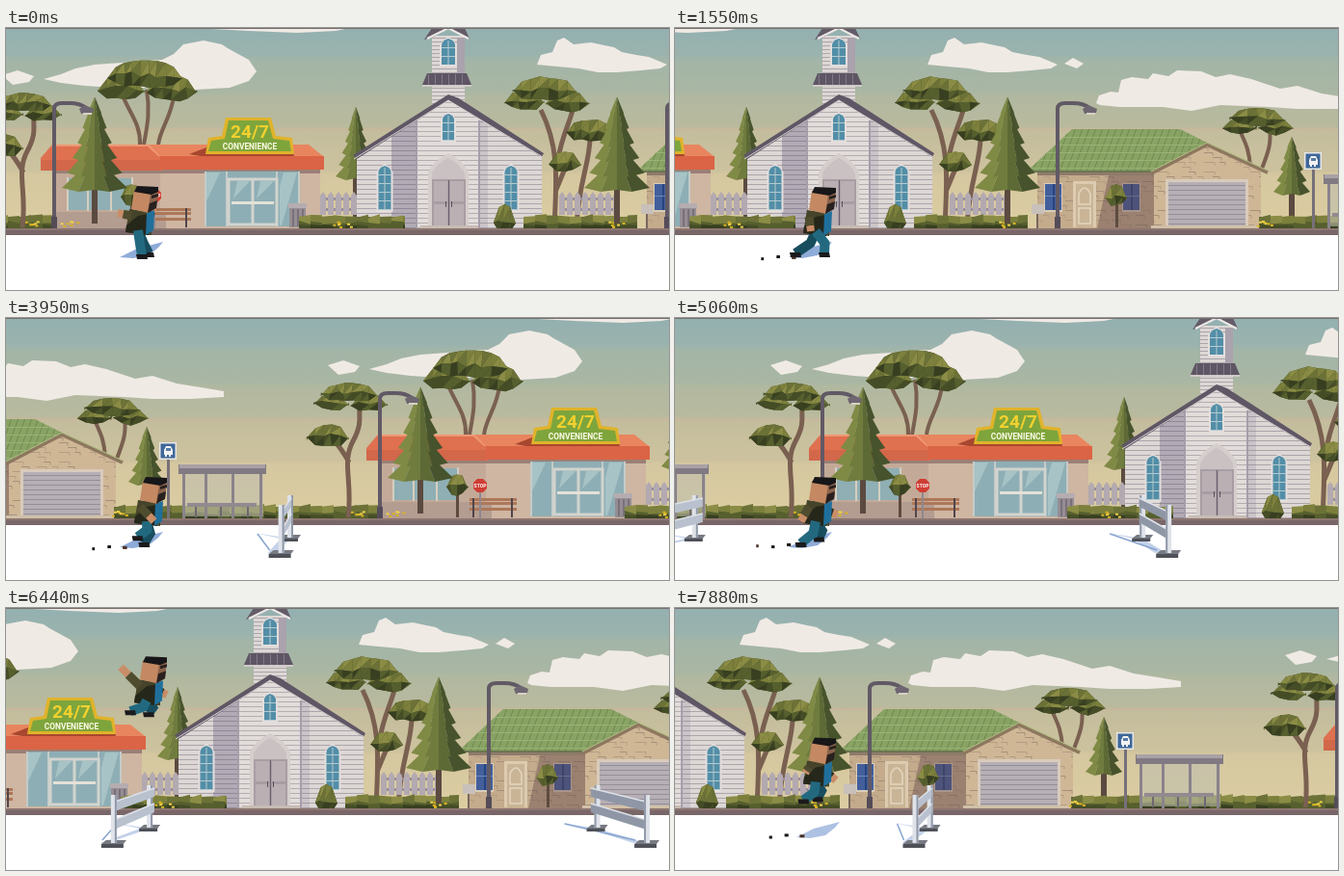
An HTML page with a canvas that plays this animation: 688x272 px, repeating every 8 s.

```html
<!DOCTYPE html>
<html lang="en">
<head>
<meta charset="utf-8">
<title>Street runner</title>
<style>
html, body { margin: 0; width: 100%; height: 100%; overflow: hidden; background: #fff; }
canvas { display: block; }
</style>
</head>
<body>
<canvas id="stage" width="688" height="272"></canvas>
<script>
const ctx = document.getElementById('stage').getContext('2d');
const W = 688, H = 272, LOOP = 8000, PERIOD = 1121;

// Redraw times: [first, count], 120 ms apart within a group
const times = [0];
for (const [start, n] of [[500, 3], [890, 2], [1160, 1], [1310, 3], [1700, 3], [2090, 4], [2600, 11],
  [3950, 4], [4460, 11], [5810, 3], [6200, 9], [7310, 2], [7580, 1], [7730, 1], [7880, 1]])
  for (let i = 0; i < n; i++) times.push(start + i * 120);

const scrollKeys = [[0, 0], [500, 72], [1550, 289], [2600, 505], [3950, 783], [5060, 1018], [6440, 1306], [7880, 1605]];
function scrollAt(t) {
  let i = 1;
  while (i < scrollKeys.length - 1 && t > scrollKeys[i][0]) i++;
  const [t0, s0] = scrollKeys[i - 1], [t1, s1] = scrollKeys[i];
  return Math.round(s0 + (s1 - s0) * (t - t0) / (t1 - t0));
}

// Drawing helpers
let seed = 1;
const rnd = () => (seed = seed * 16807 % 2147483647) / 2147483647;
const shape = (color, d) => { ctx.fillStyle = color; ctx.fill(new Path2D(d)); };
const rect = (color, x, y, w, h) => { ctx.fillStyle = color; ctx.fillRect(x, y, w, h); };
const line = (color, width, d) => { ctx.strokeStyle = color; ctx.lineWidth = width; ctx.stroke(new Path2D(d)); };
const poly = (color, pts) => shape(color, 'M' + pts.map(p => p.join(' ')).join('L') + 'Z');
function at(x, draw) { ctx.save(); ctx.translate(x, 0); draw(); ctx.restore(); }
function clipped(d, draw) { ctx.save(); ctx.clip(new Path2D(d)); draw(); ctx.restore(); }
function label(text, x, y, size, color) {
  ctx.font = `bold condensed ${size}px Roboto, "Open Sans", sans-serif`;
  ctx.textAlign = 'center';
  ctx.fillStyle = color;
  ctx.fillText(text, x, y);
}

// Faceted foliage
const LIGHT = ['#8b8c45', '#7c803c', '#6c7237'], DARK = ['#565f2e', '#454d27', '#383f21'];
const pick = list => list[Math.floor(rnd() * list.length)];
function crown(x, y, w, h) {
  const n = Math.max(4, Math.round(w / 9)), rows = [[], [], []];
  for (let i = 0; i <= n; i++) {
    const u = i / n, a = Math.sin(Math.PI * u) ** .4;
    const top = h * (.6 - .6 * a) + rnd() * 2, low = h * (.65 + .35 * a) - rnd() * 3;
    [top, top + (low - top) * (.4 + rnd() * .25), low].forEach((v, r) =>
      rows[r].push([x + u * w + (r === 1 ? (rnd() - .5) * 5 : 0), y + v]));
  }
  poly(DARK[1], [...rows[0], ...rows[2].slice().reverse()]);
  for (let i = 0; i < n; i++) for (let r = 0; r < 2; r++) {
    const tone = r ? DARK : LIGHT, a = rows[r], b = rows[r + 1];
    poly(pick(tone), [a[i], a[i + 1], b[i]]);
    poly(pick(tone), [a[i + 1], b[i + 1], b[i]]);
  }
}
function acacia(x, y, w, h) {
  crown(x, y + h * .38, w * .48, h * .58);
  crown(x + w * .5, y + h * .36, w * .5, h * .64);
  crown(x + w * .1, y, w * .76, h * .68);
}
function conifer(x, top, bottom, half, tiers = 6) {
  rect('#5b4a40', x - 3, bottom - 4, 6, 207 - bottom);
  const step = (bottom - top) / (tiers + .3);
  const edges = [-1, -.5, 0, .45, 1], tones = ['#7f8a45', '#707c3e', '#5d6a36', '#47532c'];
  for (let i = tiers - 1; i >= 0; i--) {
    const y = top + i * step, r = half * (i + 1.3) / (tiers + .3), low = y + step * 1.3;
    const neck = i ? .5 : .05;
    for (let k = 0; k < 4; k++)
      poly(tones[k], [[x + edges[k] * r * neck, y], [x + edges[k + 1] * r * neck, y],
        [x + edges[k + 1] * r, low - (k === 3 ? 4 : k % 2 * 2)], [x + edges[k] * r, low - (k ? (k + 1) % 2 * 2 : 4)]]);
  }
}
function hedge(x, w) {
  rect(DARK[0], x, 196, w, 13);
  for (let i = 0; i < w; i += 12) {
    const a = Math.min(w, i + 12), j = 193 + rnd() * 3;
    poly(pick(LIGHT), [[x + i, j + 1], [x + a, 193 + rnd() * 3], [x + a, 201 + rnd() * 3], [x + i, 200 + rnd() * 4]]);
    poly(pick(DARK), [[x + i, 204], [x + a, 205], [x + a, 209], [x + i, 209]]);
  }
}
function flowers(x) {
  for (let i = 0; i < 7; i++) rect(i % 3 ? '#d9b324' : '#eed04a', x - 9 + rnd() * 18, 200 + rnd() * 6, 3, 2);
}
function fence(x, w) {
  rect('#978d99', x, 176, w, 3);
  rect('#978d99', x, 187, w, 3);
  for (let i = 0; i < w - 4; i += 8) shape('#b3a9b0', `M${x + i} 194V174l3-4 3 4V194Z`);
}
function lamp(x) {
  line('#615965', 4, `M${x} 209V84Q${x} 78 ${x + 8} 78H${x + 16}Q${x + 27} 78 ${x + 33} 83`);
  rect('#544c58', x - 3, 196, 6, 13);
  shape('#6d6570', `M${x + 26} 84l6-4 9 4-1 4-12 1Z`);
  rect('#d8d2c4', x + 30, 88, 9, 2);
}
function sapling(x) {
  rect('#5e4b3e', x - 1, 180, 3, 27);
  crown(x - 11, 161, 22, 25);
}
function siding(d, fill, groove, step) {
  shape(fill, d);
  clipped(d, () => { for (let y = 2; y < 208; y += step) rect(groove, 0, y, PERIOD, 1); });
}

function clouds() {
  const c = '#f0eae5';
  at(289, () => {
    shape(c, 'M262 38L266 28 278 25 283 13 290 10 300 17 318 15 332 18 342 20 350 25 365 28 378 30 390 35 397 38 390 42 370 44 345 46 325 46 305 42 283 40Z');
    shape(c, 'M404 37L413 31 424 37 417 42Z');
  });
  at(505, () => shape(c, 'M221 78L224 70 236 66 244 67 247 54 258 51 275 53 280 47 296 50 305 44 330 45 345 51 360 48 382 53 412 63 430 60 455 68 480 72 504 76 504 82 470 84 430 84 400 82 350 80 320 86 290 82 245 82 225 80Z'));
  at(-338, () => {
    shape(c, 'M334 49L350 44 367 50 362 56 345 59Z');
    shape(c, 'M377 53L395 48 410 42 430 38 500 33 512 27 522 17 543 13 562 17 568 21 590 33 598 45 590 55 570 62 535 64 500 62 450 62 420 60 395 57Z');
    shape(c, 'M533 0H695L680 3 640 5 590 3Z');
  });
}

function backTrees() {
  const bark = '#7a6050';
  line(bark, 4, 'M139 121C140 100 128 88 121 70M143 121C146 104 150 88 146 64M158 121C160 104 172 92 174 70');
  acacia(95, 33, 102, 44);
  line(bark, 5, 'M17 207C22 170 10 150 22 128S26 100 30 86M18 150C12 138 6 132 2 126');
  acacia(-19, 67, 77, 31);
  crown(-26, 110, 44, 25);
  line(bark, 5, 'M569 207C571 160 575 125 555 85M572 140C577 110 585 100 590 78M592 207C594 160 606 140 606 114M570 170L580 146');
  acacia(517, 50, 87, 38);
  crown(581, 94, 50, 25);
  crown(563, 128, 34, 22);
  line(bark, 4, 'M886 145C885 125 880 118 874 104M898 146C905 128 908 120 906 102');
  acacia(857, 82, 74, 30);
  conifer(363, 82, 158, 21);
  conifer(929, 113, 174, 19, 5);
}

function store() {
  rect('#c3aa98', 48, 146, 118, 62);
  rect('#ceb6a2', 160, 146, 166, 62);
  rect('#9a8077', 48, 147, 278, 4);
  rect('#b39c90', 48, 191, 118, 17);
  rect('#8fafb4', 63, 156, 68, 33);
  for (const x of [63, 84, 108, 130]) rect('#d5cec0', x, 155, 2, 35);
  rect('#8eaeb5', 206, 149, 98, 57);
  shape('#a7c3c5', 'M208 150H222L208 180ZM288 150H302L286 205H284V165Z');
  for (const x of [206, 228, 280, 303]) rect('#c5cbc8', x, 149, 2, 57);
  line('#d2d4ce', 3, 'M231 157H281V204H231ZM256 157V204');
  rect('#e4e1d7', 234, 180, 44, 3);
  shape('#a7c3c5', 'M240 159H253L236 177ZM264 159H278L260 177Z');
  shape('#df7050', 'M36 135L48 121H151L162 133V148H36Z');
  rect('#d2674a', 36, 137, 124, 11);
  shape('#e8855f', 'M149 121H314L329 133H160Z');
  shape('#da6445', 'M160 133H330V147H160Z');
  shape('#f09773', 'M48 121H149L160 133H158L147 123H47Z');
  shape('#a8472f', 'M190 131L208 124H297L299 133H202Z');
  shape('#e0b32b', 'M228 93H275L280 112 297 114 299 131H207L210 114 224 112Z');
  shape('#7ea53c', 'M231 96H272L277 115 294 117 296 128H210L213 117 227 115Z');
  label('24/7', 253, 114, 19, '#f2d12f');
  label('CONVENIENCE', 253, 125.5, 8.4, '#fffbe8');
  for (const y of [187, 191, 197]) rect('#ad7758', 143, y, 49, 3);
  for (const x of [146, 186]) rect('#51454a', x, 187, 2, 20);
  rect('#958d93', 294, 186, 17, 21);
  rect('#b5adb0', 293, 182, 19, 5);
  for (const x of [297, 302, 307]) rect('#79717a', x, 188, 2, 18);
  sapling(130);
  rect('#908790', 153, 178, 2, 30);
  shape('#cf3d33', 'M151 167H157L161 171V177L157 181H151L147 177V171Z');
  label('STOP', 154, 176, 5, '#fff');
}

function archWindow(x, y, w, h) {
  const arch = (g, c) => shape(c, `M${x - w - g} ${y + h + g}V${y + w}Q${x - w} ${y + 2} ${x} ${y - g}Q${x + w} ${y + 2} ${x + w + g} ${y + w}V${y + h + g}Z`);
  arch(2, '#e4dedd');
  arch(0, '#528ea7');
  rect('#b5cad0', x - .5, y + 2, 1, h - 2);
  for (let v = y + 9; v < y + h; v += 9) rect('#b5cad0', x - w, v, w * 2, 1);
}
function church() {
  const wall = '#ddd7d5', groove = '#aba4ab';
  siding('M442 8H476V84H442Z', wall, groove, 4);
  rect('#aaa2ad', 468, 10, 8, 38);
  shape('#645c68', 'M442 0H476L481 11 474 8 459 0 444 9 434 12Z');
  line('#eee9e7', 2, 'M437 11L459 0 480 11');
  archWindow(459, 11, 7, 27);
  shape('#5e5664', 'M437 47H478L483 59H432Z');
  for (let x = 438; x < 480; x += 7) rect('#817986', x, 48, 1, 11);
  rect('#d0cac9', 432, 59, 51, 2);
  siding('M364 208V130L459 72 556 130V208Z', wall, groove, 5);
  siding('M400 208V112L427 95V208Z', '#b2abb5', '#8f8897', 5);
  siding('M490 208V92L500 98V208Z', '#cbc4c8', '#a29ba4', 5);
  siding('M427 208V94L459 73 491 94V208Z', '#e2dcda', '#b3acb1', 5);
  rect('#a69eaa', 425, 96, 2, 112);
  rect('#a69eaa', 490, 96, 2, 112);
  shape('#5f5765', 'M459 69L470 73 558 130 556 134 459 75 364 136 360 132Z');
  line('#d8d1d1', 1, 'M361 136L459 75 557 134');
  archWindow(459, 89, 6, 28);
  archWindow(393, 143, 6.5, 46);
  archWindow(524, 143, 6.5, 46);
  shape('#d6cecc', 'M438 208V150Q443 138 459 130 475 138 480 150V208Z');
  shape('#c9c1c2', 'M442 157V151Q447 141 459 135 471 141 476 151V157Z');
  rect('#a89da3', 442, 157, 35, 50);
  for (const x of [444, 461]) { rect('#bab0b3', x, 159, 14, 21); rect('#bab0b3', x, 183, 14, 22); }
  rect('#6a606d', 459, 158, 1, 48);
  rect('#57505a', 456, 180, 1, 6);
  rect('#57505a', 462, 180, 1, 6);
  rect('#c8bcb4', 430, 205, 60, 4);
}

function bricks(d, fill) {
  shape(fill, d);
  clipped(d, () => {
    for (let y = 124; y < 208; y += 5) for (let x = 150 + y % 2 * 7; x < 400; x += 16)
      if (rnd() > .35) line(rnd() > .5 ? '#b39c82' : '#a5907a', 1, `M${x} ${y}.5h${6 + Math.floor(rnd() * 7)}v3`);
  });
}
function house() {
  bricks('M160 148H282V208H160Z', '#c3ab8c');
  rect('#8f7a6b', 160, 149, 122, 4);
  const roof = 'M149 149L196 105H308L340 121 280 150Z';
  shape('#88a364', roof);
  clipped(roof, () => {
    for (let x = 140; x < 360; x += 7) line('#6f8850', 1, `M${x} 152L${x + 18} 104`);
    for (let y = 113; y < 150; y += 8) rect('#9ab274', 140, y, 220, 1);
  });
  rect('#6c7551', 150, 148, 130, 2);
  for (const x of [168, 249]) {
    rect('#d9cdb8', x - 1, 161, 19, 30);
    rect('#425f9c', x, 162, 17, 27);
    rect('#27447f', x + 8, 162, 2, 27);
    rect('#7189b5', x, 174, 17, 1);
  }
  shape('rgba(92,66,72,.4)', 'M234 153H281V208H222Z');
  rect('#dccbb0', 197, 159, 24, 48);
  rect('#c9b596', 200, 162, 18, 45);
  line('#e4d5be', 1.5, 'M203 172Q209 160 215 172V183H203ZM203 187H215V203H203Z');
  bricks('M281 208V150L336 122 392 148V208Z', '#cfb796');
  line('#8d775f', 4, 'M278 151L336 121 399 150');
  line('#b0c183', 1, 'M278 149L336 119 399 148');
  rect('#d9cbbc', 293, 157, 86, 50);
  rect('#b6afb5', 296, 160, 80, 46);
  for (let y = 163; y < 206; y += 5) rect('#958e98', 296, y, 80, 1);
  rect('#d1c0a8', 278, 205, 114, 4);
  rect('#79675f', 159, 188, 2, 20);
  rect('#c8c0bb', 154, 183, 13, 10);
  sapling(242);
}

function busStop() {
  rect('#777079', 445, 144, 3, 65);
  rect('#e8e8e6', 437, 129, 18, 18);
  rect('#3f6799', 438.5, 130.5, 15, 15);
  shape('#f2f3f3', 'M442 137L444 133H449L451 137V142H449V144H447V142H445V144H443V142H442Z');
  rect('#567ca8', 444, 135, 5, 3);
  rect('rgba(190,190,175,.55)', 461, 162, 84, 44);
  for (const x of [461, 484, 512, 541]) rect('#8a838b', x, 160, 3, 48);
  rect('#827a83', 457, 152, 91, 10);
  rect('#a9a1a5', 458, 152, 89, 4);
  rect('#928a90', 466, 192, 72, 4);
  for (const x of [474, 500, 528]) rect('#6e6770', x, 196, 2, 11);
}

function world() {
  seed = 4321;
  clouds();
  backTrees();
  store();
  fence(326, 40);
  fence(574, 62);
  church();
  at(505, house);
  hedge(895, 351);
  hedge(304, 110);
  hedge(537, 118);
  at(505, busStop);
  crown(506, 182, 23, 32);
  [65, 348, 632, 900, 1148].forEach(flowers);
  conifer(92, 72, 170, 34);
  conifer(634, 72, 170, 34);
  lamp(50);
  lamp(686);
}

function sky() {
  const g = ctx.createLinearGradient(0, 0, 0, 209);
  [[0, '#93b0b0'], [28, '#9bb3ad'], [34, '#a3b5a7'], [66, '#a9b6a3'], [72, '#b1b8a0'], [103, '#b9ba9e'],
    [105, '#c9b79c'], [107, '#c3bd9d'], [148, '#cdc29e'], [152, '#d5c79f'], [209, '#dccda2']]
    .forEach(([y, c]) => g.addColorStop(y / 209, c));
  rect(g, 0, 0, W, 209);
}

// d is the distance from the centre of the view
function barrier(d) {
  const near = 344 + 1.39 * d, far = 344 + 1.167 * d, ahead = d > 0;
  if (near < -60 && far < -60 || far > W + 60) return;
  shape('#c3d1ea', `M${far - 37} 223L${far} 229 ${near - 4} 243 ${near - 14} 244 ${far - 10} 229Z`);
  line('#86a3cf', 1.5, `M${far - 34} 224L${near - 12} 241`);
  const base = (x, y, w, h) => {
    shape('#777a82', `M${x - w} ${y}L${x - w + 5} ${y - 4}H${x + w}L${x + w - 3} ${y}Z`);
    rect('#4e5158', x - w, y, w * 2 - 3, h);
  };
  const post = (x, top, bottom, w) => {
    rect('#dfe3e9', x - w / 2, top, w, bottom - top);
    rect('#8f98a8', x + (ahead ? -w / 2 : w / 2 - 2), top, 2, bottom - top);
  };
  base(far, 229, 11, 3);
  post(far, 184, 228, 6);
  const reach = (near - far) * .13;
  for (const [a, b] of [[187, 202], [203, 221]]) {
    const l = far - reach, r = near + reach * .4;
    shape(ahead ? '#8f97a6' : '#b9c1ce', `M${l} ${a}L${r} ${b}V${b + 10}L${l} ${a + 9}Z`);
    line('#dde1e8', 1.5, `M${l} ${a}L${r} ${b}`);
  }
  base(near, 245, 13, 4);
  post(near, 194, 244, 6);
}

const RUN = 420, FLIGHT = 490, APEX = 115;
function liftAt(t) {
  return Math.max(0, ...[4480, 6420, 8300].map(c => APEX * (1 - ((t - c) / FLIGHT) ** 2)));
}
function runner(t) {
  const lift = liftAt(t), k = lift / APEX, air = lift > 0, still = t < 500;
  const phase = (t - 1550) / RUN * 2 * Math.PI, sin = Math.sin(phase);
  const foot = p => [140 + 15 * Math.cos(p), 236 - 7 * Math.max(0, -Math.sin(p))];
  let feet = [foot(phase + Math.PI), foot(phase)];
  let near = [141 - 13 * sin, 211], far = [157 + 15 * sin, 208 - 5 * sin];
  if (air) {
    feet = [[148, 231 - 5 * k], [135 - 6 * k, 235 - 11 * k]];
    near = [141 - 22 * k, 211 - 35 * k];
    far = [167, 211 - 6 * k];
  }
  if (still) { feet = [[157, 237], [150, 239]]; near = [125, 193]; far = [162, 186]; }

  ctx.globalAlpha = 1 - k;
  at(air ? 8 : 0, () => shape('#8fabd8', 'M118 238L136 229 163 222 158 228 148 236 132 239Z'));
  ctx.globalAlpha = 1;
  if (!still && k < .5) for (let i = 0; i < 3; i++) {
    const age = (t * .7 + i * 93) % 280;
    rect(i % 2 ? '#4a3024' : '#191512', 131 - age * .17, 230 + (i * 5 + age / 30) % 9, 5 - age / 110, 3);
  }

  ctx.save();
  ctx.translate(still ? -9 : 0, still ? -1 : -lift);
  const leg = ([x, y], color) => {
    const bend = still ? 0 : 5;
    line(color, 10, `M146 211L${(146 + x) / 2 + bend} ${(211 + y) / 2}L${x} ${y - 2}`);
    shape('#1b1a1c', `M${x - 6} ${y - 3}H${x + 5}L${x + 6} ${y + 2}H${x - 5}Z`);
  };
  const arm = (x0, y0, [x, y], sleeve) => {
    const mx = x0 + (x - x0) * .6, my = y0 + (y - y0) * .6;
    line('#c98d67', 8, `M${mx} ${my}L${x} ${y}`);
    line(sleeve, 9, `M${x0} ${y0}L${mx} ${my}`);
  };
  leg(feet[0], '#184d5e');
  arm(156, 200, far, '#2c2e1b');
  shape('#45442a', 'M137 189L160 192 160 216 133 213Z');
  shape('#25271a', 'M146 196L157 194 157 216 133 213 134 206Z');
  shape('#206f9b', 'M155 193L163 190 162 211 154 216Z');
  leg(feet[1], '#22697f');
  shape('#c48962', 'M142 169L160 172 157 193 139 189Z');
  shape('#8b634c', 'M159 172L167 170 165 187 156 193Z');
  shape('#29211f', 'M158 183L166 180 165 188 156 193ZM160 175L167 173V176L160 178Z');
  shape('#171619', 'M145 165L167 166V171L160 174 142 171Z');
  arm(139, 196, near, '#4f4c2f');
  ctx.restore();
}

function draw(t) {
  const s = scrollAt(t);
  rect('#fff', 0, 0, W, H);
  sky();
  for (let x = -(s % PERIOD) - PERIOD; x < W + 60; x += PERIOD) at(x, world);
  rect('#8d7670', 0, 208, W, 2);
  rect('#796669', 0, 210, W, 5);
  rect('#fff', 0, 215, W, H - 215);
  runner(t);
  for (let i = 0; i < 4; i++) barrier(741 + 398 * i - s);
  rect('#77706f', 0, 0, W, 1);
}

const start = performance.now();
let shown = -1;
function tick() {
  const t = (performance.now() - start) % LOOP;
  let step = times.length - 1;
  while (times[step] > t) step--;
  if (step !== shown) draw(times[shown = step]);
  requestAnimationFrame(tick);
}
tick();
</script>
</body>
</html>
```
